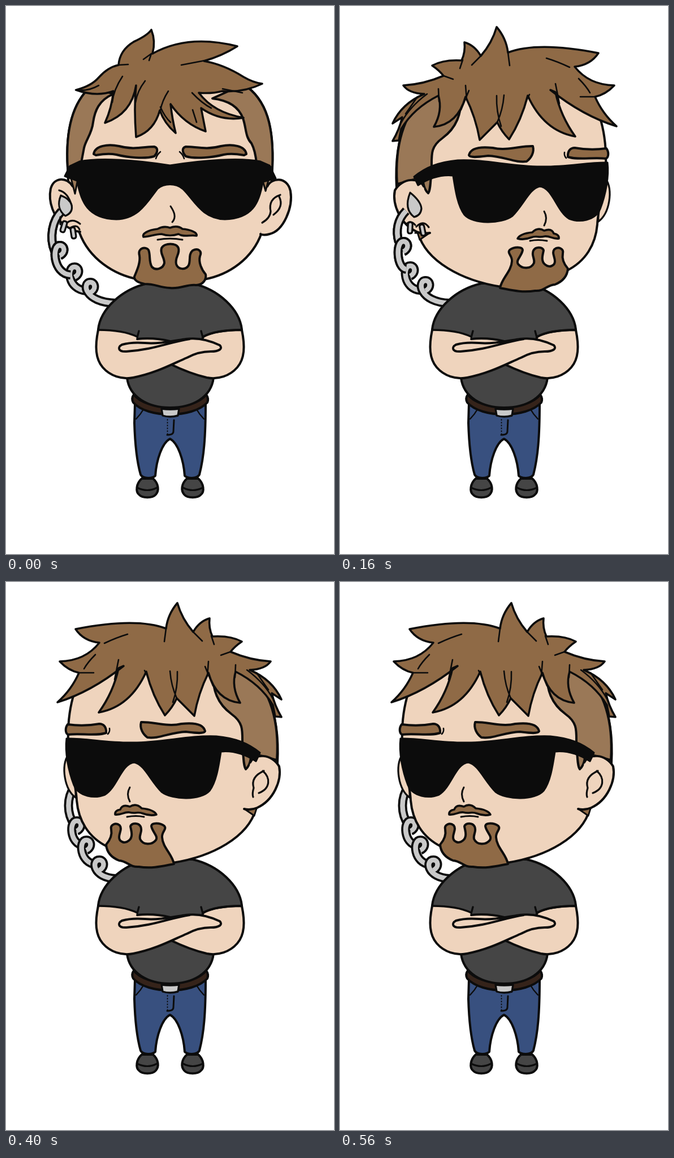
Recreate the animation shown at these times as an HTML page with a canvas. Size 580 px wide and 966 px high, loop 640 ms.

```html
<!DOCTYPE html>
<html lang="en">
<head>
<meta charset="utf-8">
<title>Bodyguard looking around</title>
<style>
html, body { margin: 0; width: 100%; height: 100%; overflow: hidden; background: #fff; }
canvas { display: block; }
</style>
</head>
<body>
<canvas id="stage" width="580" height="966"></canvas>
<script>
const W = 580, H = 966, STEP = 80, STEPS = 8;
const ctx = document.getElementById('stage').getContext('2d');
const INK = '#0c0c0c', SKIN = '#efd4bd', HAIR = '#8f6a46', SHAVED = '#9a7857';
const SHIRT = '#454545', JEANS = '#38507f', BELT = '#35231a', METAL = '#c9c9c9';

ctx.lineJoin = 'round';

function shape(d, fill, width = 4) {
  const path = new Path2D(d);
  if (fill) { ctx.fillStyle = fill; ctx.fill(path); }
  if (width) { ctx.strokeStyle = INK; ctx.lineWidth = width; ctx.lineCap = 'round'; ctx.stroke(path); }
}
const line = (d, width) => shape(d, null, width);

function mirrored(draw) {
  ctx.save();
  ctx.translate(W, 0);
  ctx.scale(-1, 1);
  draw();
  ctx.restore();
}
function both(draw) { draw(); mirrored(draw); }

function tube(d) {
  const path = new Path2D(d);
  ctx.lineCap = 'butt';
  ctx.strokeStyle = INK; ctx.lineWidth = 16; ctx.stroke(path);
  ctx.strokeStyle = METAL; ctx.lineWidth = 8.5; ctx.stroke(path);
}

// One loop of the spiral cord, from its top to its lower end
function curl([x, y, ex, ey]) {
  tube(`M${x} ${y + 18}C${x + 11} ${y + 13} ${x + 9} ${y} ${x} ${y}
    C${x - 14} ${y} ${x - 12} ${ey - 2} ${ex} ${ey}`);
}

const cords = {
  front: { lead: 'M98 362C82 378 76 408 86 432',
    curls: [[95, 422, 114, 474], [121, 460, 142, 502], [149, 487, 194, 524]] },
  right: { lead: 'M117 361C102 376 98 396 104 416',
    curls: [[112, 415, 117, 464], [124, 458, 142, 501], [151, 484, 194, 524]] },
  left: { lead: 'M121 361C107 380 107 408 121 428',
    curls: [[125, 421, 136, 464], [142, 455, 160, 498], [165, 490, 194, 523]] }
};

function body() {
  both(() => {
    shape('M240 833C230 842 229 856 235 861C241 868 259 868 265 861C271 854 270 842 260 833Z', SHIRT);
    line('M232 849Q250 858 267 849', 3.2);
  });
  shape('M228 700L227 735C228 770 232 805 238 826C242 834 260 833 264 828C266 800 276 770 290 763' +
    'C304 770 314 800 316 828C320 833 338 834 342 826C350 795 353 760 353 700Z', JEANS);
  both(() => line('M243 711Q238 720 230 728', 2.4));
  line('M297 730L296 750Q296 756 285 756', 3);
  for (let y = 729; y < 756; y += 5) line(`M285.5 ${y}v1`, 1.8);
  shape('M226 685C248 714 332 714 354 685Q359 692 356 699C330 727 250 727 225 699Q221 692 226 685Z', BELT);
  shape('M275 710Q290 712 306 710L304 722Q290 726 277 722Z', METAL, 3.4);
  shape('M250 489C203 500 167 535 163 570L214 655C218 690 252 708 290 708C330 708 363 690 367 655' +
    'L417 570C413 535 377 500 330 489Z', SHIRT);
  // arms
  shape('M417 571C423 600 422 622 409 637C396 652 375 659 355 655Q325 648 290 631L347 587L349 583Q370 571 417 571Z', SKIN);
  const arm = 'M163 571C157 600 158 622 171 637C184 652 205 659 225 655C266 647 296 630 320 620Q340 609 362 609' +
    'C377 609 384 604 378 598Q347 583 318 587';
  shape(arm + 'L290 591Q260 584 232 587L232 582Q205 571 163 571Z', SKIN, 0);
  line(arm + 'C292 591 268 596 246 594Q222 592 205 597C196 602 199 610 213 609C262 606 290 592 325 587');
  line('M232 587Q262 584 290 591');
  both(() => line('M163 571Q207 571 232 583M235 573L232 584', 3.4));
}

function frontHead() {
  shape('M109 285C105 220 118 170 150 142L420 138C462 165 474 215 471 285C470 330 465 370 452 400' +
    'C436 445 395 474 350 482L235 482C190 474 147 445 130 400C115 365 110 330 109 285Z', SKIN);
  shape('M118 318C108 301 85 301 79 322C74 346 85 373 101 384Q117 397 131 398', SKIN);
  shape('M462 318C470 302 497 300 503 326C508 355 491 396 466 402Q456 405 450 402', SKIN);
  line('M94 325Q110 329 116 352M485 333C470 338 465 348 468 362Q467 374 453 382M483 336Q492 354 473 368', 3.2);
  shape('M109 285C105 220 118 170 150 142L190 155C164 166 157 185 154 205C152 225 141 236 138 250L131 287Z', SHAVED);
  shape('M471 285C474 215 462 165 420 138L365 163Q408 168 419 198C425 215 423 231 434 242Q441 255 443 278Z', SHAVED);
  shape('M114 300L122 331L127 305Z', SHAVED, 3);
  shape('M466 300L459 326L453 305Z', SHAVED, 3);
  both(() => {
    shape('M155 261C157 246 180 243 200 247C225 254 245 248 262 248C270 250 268 259 262 265' +
      'C245 270 215 267 195 262C180 259 165 262 159 263Z', HAIR);
    line('M273 257Q267 262 265 269', 2.6);
  });
  shape('M104 300L113 282L130 274C165 267 230 271 290 281C350 271 415 267 450 274L466 281L477 304L454 310' +
    'C448 348 435 375 387 376C345 375 332 340 312 322C300 312 280 312 268 322C250 345 235 375 195 376' +
    'C145 375 132 345 126 308Z', INK, 3);
  line('M291 353C297 362 302 372 294 381M268 412Q290 408 312 412', 3);
  shape('M243 407C240 402 250 395 268 393Q279 387 290 391Q303 386 312 393C325 394 339 399 337 405' +
    'C325 403 315 408 305 402Q290 407 275 402C262 402 255 407 243 407Z', HAIR, 3.6);
  shape('M227 477C232 465 238 452 236 440C232 425 248 424 252 430C256 440 252 450 258 460C265 467 278 463 280 453' +
    'C280 442 272 437 275 427C280 417 302 417 305 427C308 437 298 443 301 455C304 465 318 466 323 457' +
    'C327 448 322 438 330 431C340 426 347 432 343 441C340 452 346 465 353 473C355 482 348 492 336 492' +
    'C320 490 310 499 290 497C270 496 265 490 245 490C236 488 226 484 227 477Z', HAIR);
  shape('M124 148Q151 141 164 126Q180 108 199 104Q201 78 226 63Q250 52 257 42Q265 62 259 84Q322 49 409 71' +
    'Q382 88 350 97Q385 103 420 125Q437 135 453 137Q420 153 383 150Q363 155 341 153Q367 188 420 197' +
    'Q380 204 345 180L353 221Q315 208 291 173Q294 200 300 224Q280 207 272 184Q262 220 230 231' +
    'Q226 180 230 140Q222 190 175 206Q187 180 190 150Q160 161 124 148Z', HAIR, 3.6);
  line('M199 104L216 103M257 84L243 94M257 84L253 96M310 104L352 96M206 124Q190 148 188 170M229 170Q232 150 246 132' +
    'M287 150Q276 167 273 184M273 178Q281 196 291 205M329 153Q347 172 363 180M383 146L418 153' +
    'M330 183L337 205M123 148Q145 151 164 140', 2.6);
}

// Head turned towards the right edge; the other side is its mirror image
function turnedHead() {
  shape('M470 304C483 325 477 365 457 380L455 320Z', SKIN, 3.2);
  shape('M100 320C95 230 120 160 190 130L430 140C462 180 472 230 470 285C465 330 456 360 455 385' +
    'C452 420 435 450 400 467L365 495L285 495C215 484 152 450 138 400L120 380Z', SKIN);
  shape('M101 314C96 240 115 190 150 155L215 160C214 190 207 214 181 233C160 248 162 262 162 285' +
    'C160 310 160 325 156 330Q149 324 147 310L138 304Z', SHAVED);
  shape('M136 396L141 412L157 401Z', HAIR, 2.8);
  shape('M148 318C141 302 110 302 97 325C92 350 107 385 136 398Q148 403 159 400', SKIN);
  shape('M228 263C231 249 252 248 270 250C295 256 320 246 341 247C344 258 338 268 330 274' +
    'C310 277 290 265 262 264C245 266 230 268 228 263Z', HAIR);
  shape('M403 266C402 255 408 250 415 250Q443 255 471 251C476 258 475 267 470 269C450 266 420 272 403 266Z', HAIR);
  line('M397 258Q396 264 400 268', 2.6);
  shape('M131 301C152 284 175 275 208 272C260 270 300 283 355 283C400 284 440 275 473 276C476 300 470 332 460 358' +
    'C451 379 423 382 405 375C383 362 376 320 353 318C335 322 325 350 305 370C285 385 235 385 220 368' +
    'C208 352 204 325 200 299C180 297 160 302 138 316Z', INK, 3);
  line('M361 362Q368 374 361 387M336 414Q350 411 366 414', 3);
  shape('M314 410C318 402 330 400 340 399Q350 389 361 396Q374 391 378 401Q388 403 387 410' +
    'C375 411 372 405 362 406C350 409 348 404 338 408Q325 413 314 410Z', HAIR, 3.6);
  shape('M283 497C286 480 303 468 304 450C305 440 295 436 300 430C308 424 322 424 323 430C322 440 310 448 315 455' +
    'C322 464 338 464 343 453C345 445 338 440 342 431C346 424 358 424 360 431C358 440 355 450 363 456' +
    'C370 462 380 458 380 450C380 442 374 435 379 429C386 423 396 428 394 436C392 446 396 455 403 463' +
    'C402 475 395 485 380 491C365 492 362 503 345 502C320 506 300 500 283 497Z', HAIR);
  shape('M112 140Q148 138 183 123Q175 113 163 105Q183 94 215 96Q222 81 220 64Q238 69 249 88Q269 65 277 37' +
    'Q294 57 297 82Q350 62 457 83Q443 104 415 107Q440 139 485 140Q470 156 451 160Q464 190 489 212' +
    'Q430 194 372 148L381 152Q390 194 416 230Q360 220 332 158Q321 201 299 235Q286 222 278 205' +
    'L247 236Q240 196 222 160Q208 209 166 213Q182 185 174 158Q130 180 108 217L104 237L93 238' +
    'Q105 218 110 196L93 207Q109 172 149 155Q122 154 112 140Z', HAIR, 3.6);
  line('M183 123L200 129M217 95L212 110M249 88L233 104M297 82L300 105M365 92Q385 98 406 108M425 160L451 160' +
    'M422 128Q436 142 442 153M228 149L214 183M222 140L224 166M277 158Q276 186 285 212M290 157Q288 183 278 205' +
    'M381 137L388 172M335 156L328 170M174 146L175 168M154 155Q123 178 108 206M137 160L116 190', 2.6);
}

// Pill-shaped ring clip
function clip(x, y, tilt) {
  ctx.save();
  ctx.translate(x, y);
  ctx.rotate(tilt);
  shape('M-4 -6Q-4 -10 0 -10Q4 -10 4 -6L4 6Q4 10 0 10Q-4 10 -4 6Z', METAL, 3.2);
  ctx.restore();
}

const poses = {
  front() {
    frontHead();
    tube(cords.front.lead);
    curl(cords.front.curls[0]);
    shape('M97 334C91 348 93 361 105 370Q119 364 116 351Q113 340 97 334Z', METAL, 3.2);
    line('M108 382Q118 374 131 384M114 391Q126 384 130 394M96 372L96 385', 3.2);
    clip(102, 389, .3);
    clip(119, 400, -.15);
  },
  right() {
    turnedHead();
    tube(cords.right.lead);
    curl(cords.right.curls[0]);
    shape('M124 329C116 349 119 363 131 372Q143 369 144 357Q143 344 124 329Z', METAL, 3.2);
    line('M117 385Q124 376 133 386M135 389Q147 376 157 390M133 400L159 400', 3.2);
    clip(124, 391, .05);
    clip(146, 395, -.2);
  },
  left() {
    mirrored(() => {
      turnedHead();
      line('M124 333C140 340 146 350 142 363Q145 373 143 379M126 333C112 345 112 364 133 372', 3.2);
    });
  }
};
const sequence = ['front', 'right', 'right', 'right', 'front', 'left', 'left', 'left'];

function frame() {
  const name = sequence[Math.floor(performance.now() / STEP) % STEPS];
  ctx.fillStyle = '#fff';
  ctx.fillRect(0, 0, W, H);
  tube(cords[name].lead);
  cords[name].curls.forEach(curl);
  body();
  poses[name]();
  requestAnimationFrame(frame);
}
frame();
</script>
</body>
</html>
```
